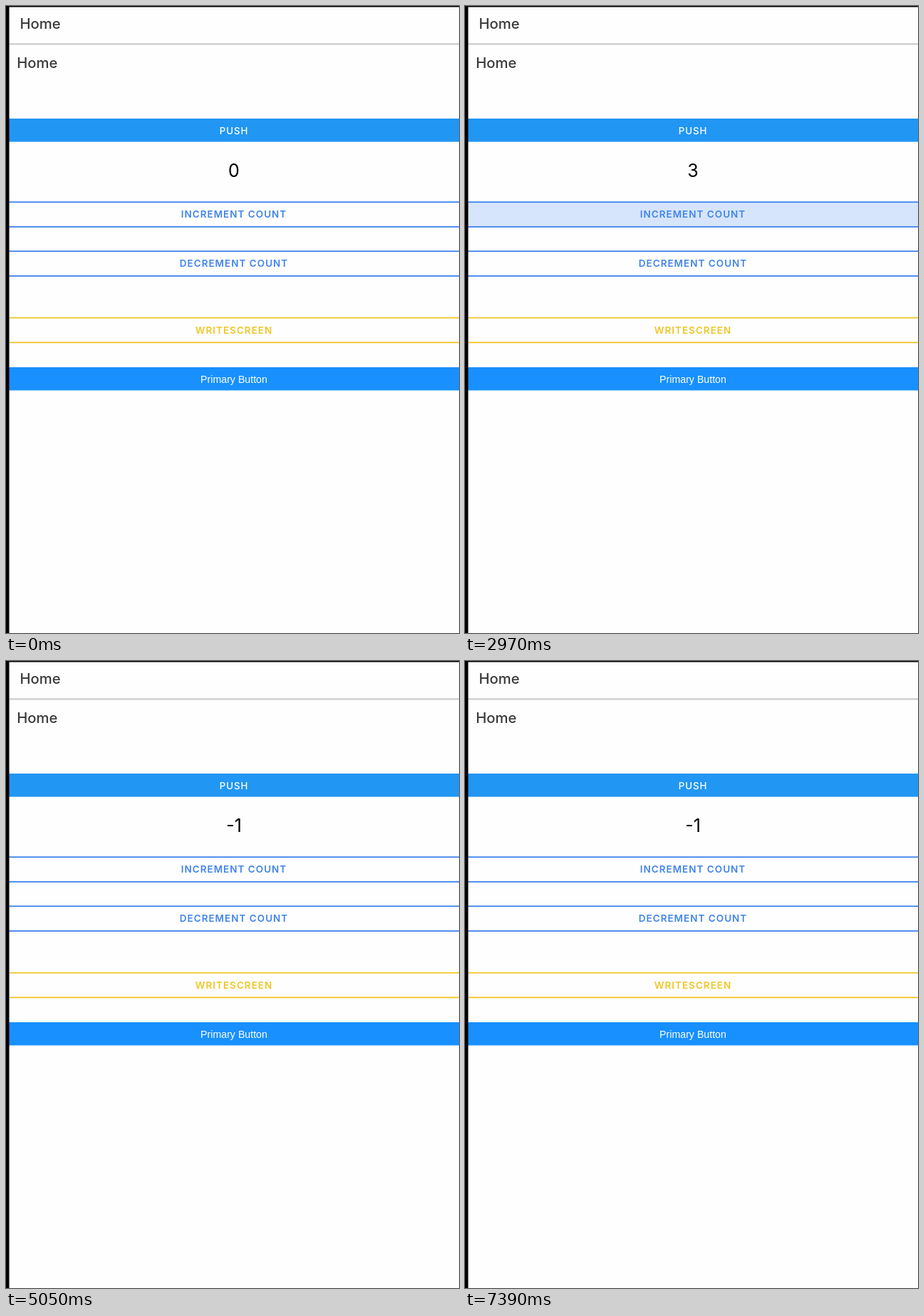
Recreate the animation shown at these times as an HTML page. Size 636 by 880 pixels, loop 7.65 s.

```html
<!DOCTYPE html>
<html lang="en">
<head>
<meta charset="utf-8">
<title>Counter app</title>
<style>
  html, body { margin: 0; width: 100%; height: 100%; overflow: hidden; background: #fefefe; }
  svg { display: block; width: 636px; height: 880px; }
  text { font-family: Inter, "Open Sans", sans-serif; }
  .title { font-size: 20.3px; font-weight: 500; fill: #3a3a3a; }
  .label { font-size: 13.5px; font-weight: 600; letter-spacing: 1px; }
  .solid { font-size: 13.3px; font-weight: 500; letter-spacing: .9px; }
  .back { font-size: 13px; font-weight: 400; letter-spacing: .7px; }
  .plain { font: 14.2px "Liberation Sans", Arial, sans-serif; }
</style>
</head>
<body>
<svg id="stage" viewBox="0 0 636 880"></svg>
<script>
const LOOP = 7650, STEP = 130, FIRST = 500;
const HOLD = 120, GROW = 350, FADE = 250, RADIUS = 631;
const BLUE = '#3f83ec', YELLOW = '#f0c526', GOLD = '#f6bf1c';

const presses = {
  push: [480, 5680],
  increment: [2400, 2600, 2800, 3000, 3200],
  decrement: [3615, 3822, 4030, 4238, 4446, 4650],
  goBack: [7110]
};

const between = (t, from, to) => t >= from && t < to;
const released = (list, t) => list.filter(p => t >= p + HOLD).length;

const text = (content, x, y, cls, fill, extra = '') =>
  `<text class="${cls}" x="${x}" y="${y}" fill="${fill}" ${extra}>${content}</text>`;

// Letter-spacing trails the last glyph, so the centre is nudged slightly.
const centred = (content, y, cls, fill, extra = '') =>
  text(content, 320, y, cls, fill, `text-anchor="middle" ${extra}`);

const rect = (x, y, w, h, fill) =>
  `<rect x="${x}" y="${y}" width="${w}" height="${h}" fill="${fill}"/>`;

// Circular press feedback: grows linearly and fades out after release.
function ripples(list, t, x, y, h, color) {
  return list.map(start => {
    const age = t - start;
    if (age < 0 || age > HOLD + FADE) return '';
    const scale = .1 + .9 * Math.min(age / GROW, 1);
    const rise = .5 + .5 * Math.min(age, HOLD) / GROW;
    const alpha = .32 * rise * (1 - Math.max(0, age - HOLD) / FADE);
    return `<svg x="0" y="${y}" width="636" height="${h}">
      <circle cx="${x}" cy="${h / 2}" r="${RADIUS * scale}" fill="${color}" fill-opacity="${alpha}"/></svg>`;
  }).join('');
}

function solidButton(label, y, h, fill, cls, baseline, list = [], t = 0) {
  return rect(4, y, 632, h, fill) + ripples(list, t, 319, y, h, '#fff') +
    centred(label, baseline, cls, '#fff');
}

function outlineButton(label, y, color, list = [], t = 0, hover = '') {
  return (hover ? rect(4, y, 632, 35, hover) : '') +
    ripples(list, t, 319, y, 35, color) +
    rect(4, y - .9, 632, 1.8, color) + rect(4, y + 33.8, 632, 1.8, color) +
    centred(label, y + 22, 'label', color);
}

const headerLine = rect(4, 52, 632, 3.5, 'url(#shade)');

function home(t, count) {
  const onIncrement = between(t, 2060, 3490) ? '#f5f9fd' : '';
  const onDecrement = between(t, 3490, 5050) ? '#f6f9ff' : '';
  return headerLine +
    text('Home', 19.4, 32, 'title', '#3a3a3a') +
    text('Home', 15.2, 87.3, 'title', '#3a3a3a') +
    solidButton('PUSH', 158, 32.6, '#2196f3', 'solid', 180, presses.push, t) +
    centred(count, 240, '', '#000', 'font-size="25"') +
    outlineButton('INCREMENT COUNT', 275.2, BLUE, presses.increment, t, onIncrement) +
    outlineButton('DECREMENT COUNT', 344.2, BLUE, presses.decrement, t, onDecrement) +
    outlineButton('WRITESCREEN', 437.6, YELLOW) +
    solidButton('Primary Button', 507, 32.5, '#1890ff', 'plain', 528.8);
}

function detail(t, count) {
  const hover = between(t, 1150, 1670);
  const pressed = between(t, 1410, 1670);
  return (hover ? '<circle cx="25" cy="25" r="24" fill="#f7f7f7"/>' : '') + headerLine +
    `<path d="M33.5 24.7H18M25 16.8L17.2 24.7L25 32.6" fill="none" stroke="#3a3a3a"
      stroke-width="2" opacity="${pressed ? .5 : 1}"/>` +
    text('Detail', 67.4, 32, 'title', '#3a3a3a') +
    centred('DetailScreen', 103.5, '', '#000', 'font-size="20.4"') +
    solidButton('GOBACK', 188, 31.6, '#ffa500', 'back', 208.7, presses.goBack, t) +
    outlineButton('INCREMENT COUNT', 275.2, GOLD) +
    centred(count, 365, '', '#000', 'font-size="21"');
}

const defs = `<defs><linearGradient id="shade" x2="0" y2="1">
  <stop stop-color="#e4e4e4"/><stop offset=".4" stop-color="#c8c8c8"/>
  <stop offset="1" stop-color="#fefefe"/></linearGradient></defs>`;
const frame = rect(0, 0, 4.5, 880, '#000') + rect(0, 0, 636, 1.5, '#000');
const stage = document.getElementById('stage');
let shown = -1;

function draw(now) {
  const time = now % LOOP;
  const t = time < FIRST ? 0 : FIRST + Math.floor((time - FIRST) / STEP) * STEP;
  if (t !== shown) {
    shown = t;
    const count = released(presses.increment, t) - released(presses.decrement, t);
    const onDetail = between(t, 760, 1670) || between(t, 5960, 7390);
    stage.innerHTML = defs + rect(0, 0, 636, 880, '#fefefe') +
      (onDetail ? detail : home)(t, count) + frame;
  }
  requestAnimationFrame(() => draw(performance.now() - origin));
}

const origin = performance.now();
draw(0);
</script>
</body>
</html>
```
